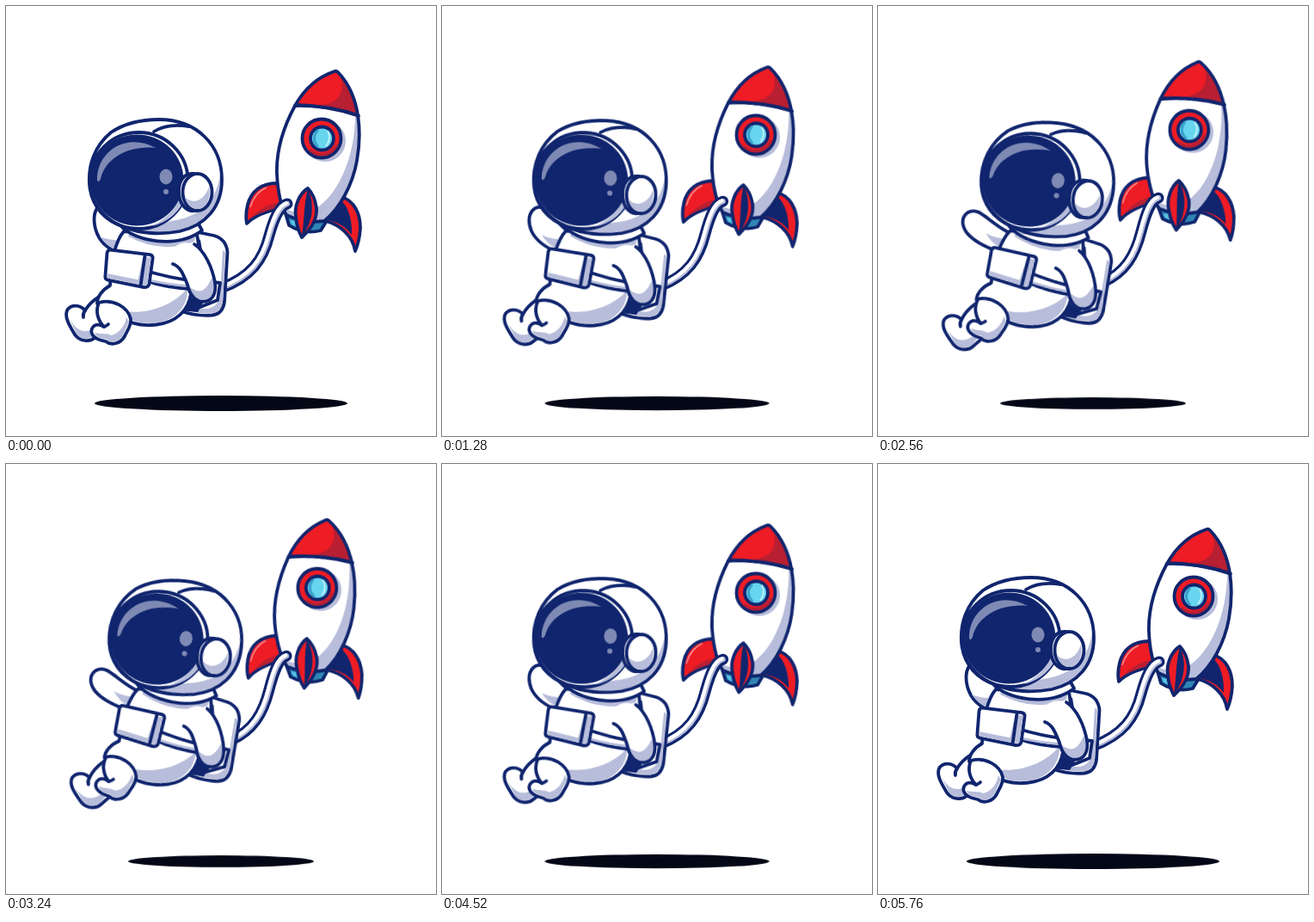
Animation, 500 px wide and 500 px high, one loop 5800 ms. Source, as an HTML page:

```html
<!DOCTYPE html>
<html lang="en">
<head>
<meta charset="utf-8">
<title>Floating astronaut</title>
<style>
html, body { margin: 0; width: 100%; height: 100%; overflow: hidden; background: #fff; }
svg { display: block; width: 100vw; height: 100vh; }

:root { --navy: #10256e; --lilac: #b7bdda; --red: #ee1c25; --wine: #b81f32; }
.w, .l, .r { stroke: var(--navy); stroke-width: 3.8; stroke-linejoin: round; stroke-linecap: round; }
.w { fill: #fff; }
.l { fill: none; }
.r { fill: var(--red); }
.s { fill: var(--lilac); }
.d { fill: var(--wine); }
.n { fill: var(--navy); }
.g { fill: #7f8ab4; }
.bare { stroke: none; }

/* Everything drifts between two poses on one sine-like swing. */
.move { animation: 2.9s cubic-bezier(.37, 0, .63, 1) infinite alternate; }
#shadow { transform-origin: 250px 462px; animation-name: shrink; }
#rocket { transform-origin: 220px 224px; animation-name: tilt; }
#astro { transform-origin: 154px 424px; animation-name: lean; }
#leg { transform-origin: 180px 366px; animation-name: kick; }
#arm { animation-name: wave; }
.rope { fill: none; stroke-linecap: round; animation-name: sway; }

@keyframes shrink { to { transform: scale(.725, .76); } }
@keyframes tilt { to { transform: rotate(-4.05deg); } }
@keyframes lean { to { transform: rotate(6.2deg); } }
@keyframes kick { to { transform: rotate(-11.2deg); } }
@keyframes wave {
  from { d: path("M134 288C118 283 108 274 104 259C98 234 114 222 124 234C130 242 136 254 146 264Z"); }
  to { d: path("M128 289C112 284 96 280 86 270C73 256 83 241 97 245C106 248 118 258 134 264Z"); }
}
@keyframes sway {
  from { d: path("M327 230C317 233 311 249 306 267C299 295 285 315 250 328"); }
  to { d: path("M326 223C316 226 311 243 306 262C299 290 287 310 262 321"); }
}
</style>
</head>
<body>
<svg viewBox="0 0 500 500">
  <defs>
    <path id="hull" d="M382 76C361 83 346 98 336 116C322 142 314 167 315 195C316 217 320 233 326 243C340 250 356 252 370 250C388 236 403 208 408 180C413 152 414 106 386 77Q384 75 382 76Z"/>
    <path id="dome" d="M97.500 212C94 185 104 162 122 147C140 135 160 132 178 132C222 132 251 162 251 202C251 234 232 255 202 262C180 266 155 265 138 257C115 250 101 234 97.500 212Z"/>
    <clipPath id="inHull"><use href="#hull"/></clipPath>
    <clipPath id="inDome"><use href="#dome"/></clipPath>
  </defs>

  <ellipse id="shadow" class="move" cx="250" cy="462" rx="147" ry="9" fill="#040716"/>

  <g id="rocket" class="move">
    <path class="l" style="fill:#2f86b4" d="M325 241L329 255Q346 266 366 261L374 248Z"/>
    <path d="M330 249L332 254Q339 258 346 259L345 251Z" fill="#55c3e4"/>
    <path class="r" d="M316 206C297 206 285 215 281 231Q278 243 280 253C289 244 305 238 321 235Z"/>
    <path class="d" d="M318 228C305 230 293 237 285 246C296 240 307 237 319 233Z"/>
    <path d="M284 234Q289 217 303 211" fill="none" stroke="#f7898d" stroke-width="1.500"/>
    <path class="r" d="M390 222C405 226 412 242 412 258Q411 274 406 285C403 267 389 255 372 250Z"/>
    <path class="n" d="M388 225C397 231 403 247 402 266C394 255 384 251 374 249Z"/>

    <use href="#hull" fill="#fff"/>
    <g clip-path="url(#inHull)">
      <path class="s" d="M406 118C408 170 388 224 352 240Q337 243 320 233L330 258L375 256L420 190L418 110Z"/>
      <path class="r" d="M325 115Q374 114 420 131L410 65L350 65Z"/>
      <path class="d" d="M364 115C385 114 395 102 389 82L412 90L412 128Q388 118 364 115Z"/>
    </g>
    <path class="l" d="M336 116Q376 115 410 127.500"/>
    <use href="#hull" class="l"/>

    <circle class="s" cx="371" cy="157" r="24"/>
    <circle class="r" cx="367" cy="154" r="22.500"/>
    <path d="M353 167A20 20 0 0 0 385 161" fill="none" stroke="#b81f32" stroke-width="3"/>
    <circle class="l" style="fill:#68d5ef" cx="367.500" cy="154" r="13.500"/>
    <path d="M363 144Q354 154 363 164" fill="none" stroke="#3a9fcb" stroke-width="3"/>
    <path d="M374 145Q379 154 372 163" fill="none" stroke="#b9f0fa" stroke-width="2"/>

    <path class="r" d="M351 212C341 218 335 233 337 245Q338 258 344 269C354 260 362 249 361 235Q359 220 351 212Z"/>
    <path class="n" d="M351 213C346 231 347 251 344 268C354 256 361 234 351 213Z"/>
  </g>

  <path class="move rope" stroke="#10256e" stroke-width="13"/>
  <path class="move rope" stroke="#b7bdda" stroke-width="6.200"/>
  <g transform="translate(-1 -.8)"><path class="move rope" stroke="#fff" stroke-width="4.200"/></g>

  <g id="astro" class="move">
    <g id="leg" class="move">
      <path class="w" d="M130 330C113 333 99 342 92 354C86 347 76 347 71.500 353C67 361 74 372 80 382C86 390 97 391 103 386L122 372Z"/>
      <path class="s" d="M74 364C82 378 92 382 104 374L112 374L102 384C95 389 86 388 82 381Z"/>
      <path class="l" d="M92 354Q89 358 90 362"/>
    </g>

    <path id="arm" class="move w"/>
    <path class="s" d="M109 268Q118 272 128 272L129 284Q116 279 109 268Z"/>

    <!-- backpack -->
    <path class="w" d="M218 262L242 267Q256 271 257.500 286L254 344Q252 358 240 359.500Q222 361 204 355Z"/>
    <path class="s" d="M252 284L249 336Q247 350 234 352L208 352Q222 359 240 357Q250 356 252 344L255 286Z"/>
    <path class="l" d="M240 321L249 322L246 342L226 350"/>
    <path class="n" d="M211 268L226 272L230 296L216 282Z M212 338L230 344L223 356L200 354Z"/>

    <!-- suit -->
    <path class="w" d="M137 262C126 275 122 300 121 325C112 330 106 338 106 346C118 344 130 348 135 358C138 368 155 373 175 370.500C198 368 212 354 215 335C216 310 228 290 222 266Z"/>
    <path class="s" d="M138 355C165 359 195 348 211 328C212 350 196 366 174 368.500C156 370 140 366 138 355Z"/>
    <path class="s" d="M144 263Q182 282 220 268L219 274Q182 289 142 268Z"/>
    <path class="w" d="M108 345C124 340 142 350 145 364C146 372 140 379 138 384C133 393 122 395 116 390C104 388 97 382 100 375C103 369 109 370 114 373C106 365 104 354 108 345Z"/>
    <path class="s" d="M103 380C113 382 118 380 122 383C132 381 138 372 140 362L143 367L136 383C132 391 122 392 117 387.500C110 387 105 385 103 380Z"/>
    <path class="l" d="M114 373Q117 372 119 370"/>

    <!-- hose and chest box -->
    <path class="w" d="M163 308C180 313 198 317 214 319L215 329C195 328 178 325 161 319Z"/>
    <path class="s" d="M165 317Q190 323 212 324L212 327Q186 325 165 320Z"/>
    <g transform="translate(-1.500 -.8)">
      <path class="w" d="M123 284.500L169 290Q173 291 172 295L168 324Q167 328 162 328L120 319.500Q116 318 117 314L119 288Q120 284 123 284.500Z"/>
      <path class="s" d="M120 312L155 319L161 293L170 293L166 324Q165 326 161 325.500L121 317.500Q119 316 120 312Z"/>
      <path class="l" d="M163 291L158 326"/>
    </g>

    <!-- near arm -->
    <path class="w bare" d="M195 300C203 304 206 312 211 324C214 338 222 345 232 343.500C243 341 244 330 243 322C240 304 231 285 219 277Q205 272 195 281Z"/>
    <path class="s" d="M213 326C224 336 233 332 239 316L241 322C242 332 241 339 232 341.500C222 343 216 337 213 326Z"/>
    <path class="l" d="M194 300C203 303 206 312 211 324C214 338 222 345 232 343.500C243 341 244 330 243 322C240 304 231 285 219 277"/>

    <!-- helmet -->
    <path class="w" d="M133 255C150 275 200 282 228 261L222 250Z"/>
    <use href="#dome" fill="#fff"/>
    <g clip-path="url(#inDome)">
      <path class="s" d="M249 195C245 228 224 246 192 250L150 260L160 280L230 270L265 200Z"/>
    </g>
    <path class="l" d="M172 146Q188 136 213 140"/>
    <use href="#dome" class="l"/>
    <ellipse class="w" cx="154.500" cy="203" rx="57" ry="56"/>
    <path class="s" d="M207 190Q211 234 170 256Q200 248 209 220Z"/>
    <ellipse class="n" cx="152.500" cy="202.500" rx="54" ry="53"/>
    <path class="g" d="M106 203C105 170 139 146 174 165C143 162 116 176 110 201Q108 206 106 203Z"/>
    <ellipse class="g" cx="186" cy="198.500" rx="7.500" ry="9"/>
    <circle class="g" cx="186" cy="216" r="3"/>

    <!-- earpiece -->
    <path class="w" d="M219 195C206 193 200 206 201 218C202 231 210 240 221 238Z"/>
    <ellipse class="w" cx="222.500" cy="216.500" rx="17" ry="21.500"/>
    <path class="s" d="M208 222C218 232 231 226 236 210C239 226 231 237 222 236Q211 235 208 222Z"/>
  </g>
</svg>
</body>
</html>
```
